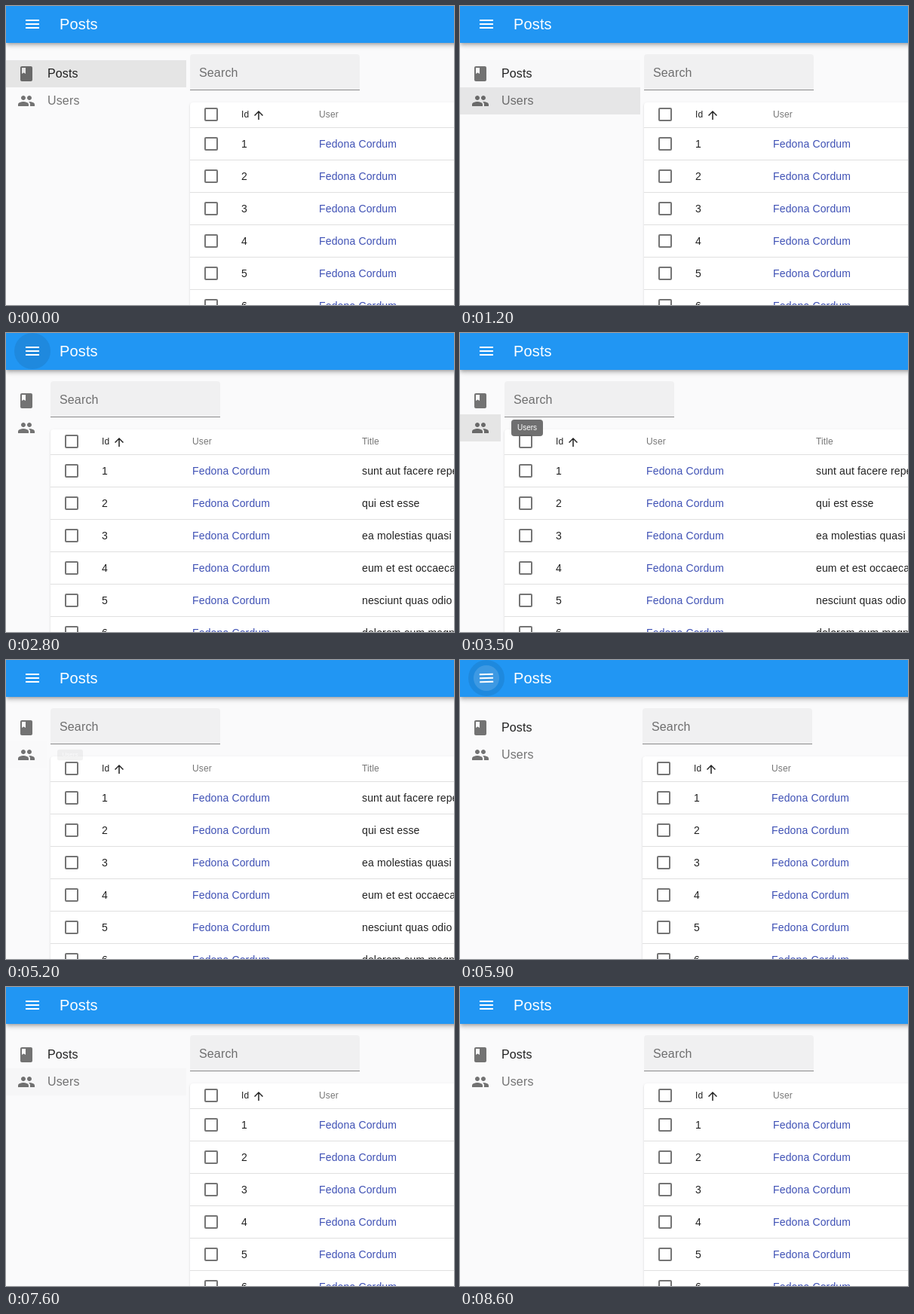
Write an HTML page that moves like this. It is 594 by 397 pixels and loops after 8800 ms.

```html
<!DOCTYPE html>
<html lang="en">
<head>
<meta charset="utf-8">
<title>Posts</title>
<style>
html, body { margin: 0; width: 100%; height: 100%; overflow: hidden; background: #fafafb; }
body { position: relative; font: 16px "Liberation Sans", Arial, sans-serif; color: rgba(0,0,0,.87); }
div, span, svg { position: absolute; top: 0; white-space: nowrap; }
svg { width: 24px; height: 24px; fill: currentColor; }
.soft, .nav svg { color: rgba(0,0,0,.54); }

#bar { left: 0; right: -20px; height: 49px; background: #2196f3; color: #fff;
  box-shadow: 0 2px 4px -1px rgba(0,0,0,.2), 0 4px 5px rgba(0,0,0,.14), 0 1px 10px rgba(0,0,0,.12); }
#bar span { left: 71px; font-size: 20px; line-height: 48px; letter-spacing: .15px; }
#button { left: 11px; width: 48px; height: 48px; border-radius: 50%; overflow: hidden; }
#button svg { left: 12px; top: 12px; }
#ripple { left: 0; width: 48px; height: 48px; border-radius: 50%; background: #fff; }

#side { left: 0; top: 72px; height: 72px; overflow: hidden; }
.nav { left: 0; width: 100%; height: 36px; line-height: 36px; letter-spacing: .15px; }
#users { top: 36px; }
.nav svg { left: 15px; top: 6px; }
.nav span { left: 55px; }

#main { left: var(--main); }
#search { left: 0; top: 64px; width: 225px; height: 47px; border-bottom: 1px solid rgba(0,0,0,.42);
  border-radius: 4px 4px 0 0; background: rgba(0,0,0,.04); letter-spacing: .15px; }
#search span { left: 12px; line-height: 49px; }
#table { left: 0; top: 128px; width: 780px; height: 400px; border-radius: 4px; background: #fff;
  box-shadow: 0 2px 1px -1px rgba(0,0,0,.2), 0 1px 1px rgba(0,0,0,.14), 0 1px 3px rgba(0,0,0,.12); }
.row { left: 0; width: 100%; height: 42px; border-bottom: 1px solid #e0e0e0; font-size: 14px;
  line-height: 42px; letter-spacing: .15px; }
.row svg { left: 16px; top: 9px; }
.row.head { height: 33px; line-height: 33px; font-size: 12px; letter-spacing: .13px; }
.head svg { top: 4px; }
.row.head svg { top: 4px; }
.row.head .arrow { left: 82px; top: 8px; width: 18px; height: 18px; }
.id { left: 68px; }
.user { left: var(--user); }
.title { left: var(--title); }
.link { color: #3f51b5; }

.tip { left: 68px; padding: 4px 8px; border-radius: 4px; background: rgba(97,97,97,.9); color: #fff;
  font-size: 10px; line-height: 14px; transform-origin: 0 50%; }
#tipPosts { top: 79px; }
#tipUsers { top: 115px; }
</style>
</head>
<body>
<div id="side">
  <div class="nav" id="posts"><svg viewBox="0 0 24 24"><path d="M18 2H6c-1.1 0-2 .9-2 2v16c0 1.1.9 2 2 2h12c1.1 0 2-.9 2-2V4c0-1.1-.9-2-2-2zM6 4h5v8l-2.5-1.5L6 12V4z"/></svg><span>Posts</span></div>
  <div class="nav" id="users"><svg viewBox="0 0 24 24"><path d="M16 11c1.66 0 2.99-1.34 2.99-3S17.66 5 16 5c-1.66 0-3 1.34-3 3s1.34 3 3 3zm-8 0c1.66 0 2.99-1.34 2.99-3S9.66 5 8 5C6.34 5 5 6.34 5 8s1.34 3 3 3zm0 2c-2.33 0-7 1.17-7 3.5V19h14v-2.5c0-2.33-4.67-3.5-7-3.5zm8 0c-.29 0-.62.02-.97.05 1.16.84 1.97 1.97 1.97 3.45V19h6v-2.5c0-2.33-4.67-3.5-7-3.5z"/></svg><span class="soft">Users</span></div>
</div>
<div id="main">
  <div id="search"><span class="soft">Search</span></div>
  <div id="table"></div>
</div>
<div id="bar">
  <div id="button"><div id="ripple"></div><svg id="menu" viewBox="0 0 24 24"><path d="M3 6h18v2H3zm0 5h18v2H3zm0 5h18v2H3z"/></svg></div>
  <span>Posts</span>
</div>
<div class="tip" id="tipPosts">Posts</div>
<div class="tip" id="tipUsers">Users</div>
<script>
const LOOP = 8800, STEP = 100;
const $ = id => document.getElementById(id);

const box = '<svg class="soft" viewBox="0 0 24 24"><rect x="4" y="4" width="16" height="16" rx="1" fill="none" stroke="currentColor" stroke-width="2"/></svg>';
const titles = ['sunt aut facere repellat provident', 'qui est esse', 'ea molestias quasi exercitationem',
  'eum et est occaecati', 'nesciunt quas odio', 'dolorem eum magni eos aperiam'];
$('table').innerHTML = `<div class="row head">${box}<span class="id">Id</span>
<svg class="arrow" viewBox="0 0 24 24"><path d="M4 12l1.41 1.41L11 7.83V20h2V7.83l5.58 5.59L20 12l-8-8-8 8z"/></svg>
<span class="user soft">User</span><span class="title soft">Title</span></div>` +
  titles.map((title, i) => `<div class="row" style="top:${34 + 43 * i}px">${box}<span class="id">${i + 1}</span>
<span class="user link">Fedona Cordum</span><span class="title">${title}</span></div>`).join('');

// cubic-bezier(x1, 0, x2, 1), solved by bisection
const bezier = (x1, x2) => x => {
  if (x <= 0) return 0;
  if (x >= 1) return 1;
  let lo = 0, hi = 1, s;
  for (let i = 0; i < 24; i++) {
    s = (lo + hi) / 2;
    const at = 3 * x1 * s * (1 - s) ** 2 + 3 * x2 * s * s * (1 - s) + s ** 3;
    if (at < x) lo = s; else hi = s;
  }
  return s * s * (3 - 2 * s);
};
const ease = bezier(.4, .2), sharp = bezier(.4, .6);

// Pointer visits as [enter, leave] times
const visits = {
  posts: [[-500, 1105], [1460, 1560], [3130, 3215], [3870, 4420], [6930, 7010]],
  users: [[1105, 1440], [3215, 3740], [4420, 5085], [7450, 7520]],
  button: [[1680, 3050], [5300, 6840]]
};
const tips = {
  tipPosts: [[3870, 4420]],
  tipUsers: [[3320, 3740], [4420, 5085]]
};
const presses = [[2320, 2334], [5650, 5720]];
const [closeAt, openAt] = presses.map(p => p[1]);

const level = (spans, t, dur, lag = 0) => Math.max(...spans.map(([a, b]) =>
  ease((t - a) / dur) * (1 - ease((t - b - lag) / dur))));

function draw(t) {
  const open = 1 - sharp((t - closeAt) / 195) + sharp((t - openAt) / 195);
  const px = v => Math.round(v) + 'px';
  const root = document.body.style;
  root.setProperty('--main', px(59 + 185 * open));
  root.setProperty('--user', px(188 - 17 * open));
  root.setProperty('--title', px(413 - 49 * open));
  $('side').style.width = px(54 + 185 * open);
  $('menu').style.transform = `rotate(${180 * open}deg)`;

  for (const id in visits)
    $(id).style.backgroundColor = `rgba(0,0,0,${.085 * level(visits[id], t, 150)})`;

  for (const id in tips) {
    const k = level(tips[id], t, 116, 58);
    $(id).style.opacity = level(tips[id], t, 174);
    $(id).style.transform = `scale(${.75 + .25 * k}, ${.5625 + .4375 * k})`;
  }

  const [down, up] = presses[t < 4000 ? 0 : 1];
  const grow = ease((t - down) / 550);
  $('ripple').style.transform = `scale(${grow})`;
  $('ripple').style.opacity = (.1 + .2 * grow) * (1 - ease((t - up) / 550));
}

const start = performance.now();
function tick() {
  const t = (performance.now() - start) % LOOP;
  draw(Math.floor(t / STEP) * STEP);
  requestAnimationFrame(tick);
}
tick();
</script>
</body>
</html>
```
